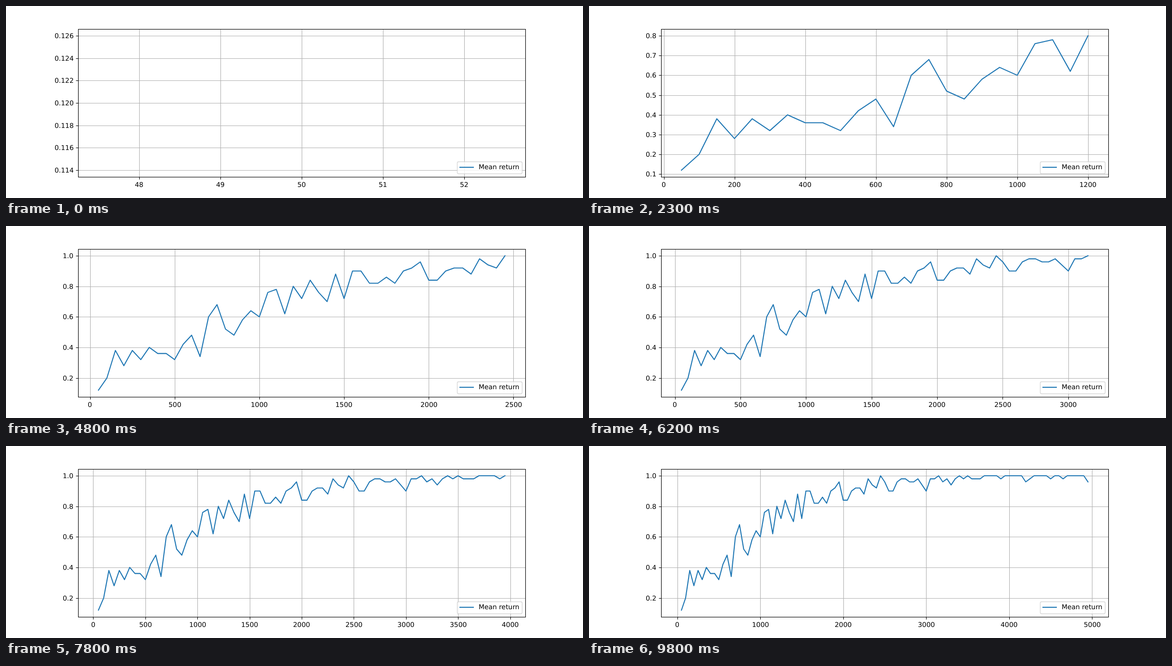
An HTML page with a canvas for the animation above (9.9 s loop, 1200 by 400 pixels).

```html
<!DOCTYPE html>
<html lang="en">
<head>
<meta charset="utf-8">
<title>Mean return</title>
<style>
  html, body { margin: 0; width: 100%; height: 100%; overflow: hidden; background: #fff; }
  canvas { display: block; }
</style>
</head>
<body>
<canvas id="chart" width="1200" height="400"></canvas>
<script>
const ctx = document.getElementById('chart').getContext('2d');

// Mean return in percent, one sample every 50 episodes
const returns = [
  12, 20, 38, 28, 38, 32, 40, 36, 36, 32, 42, 48, 34, 60, 68, 52, 48, 58, 64, 60,
  76, 78, 62, 80, 72, 84, 76, 70, 88, 72, 90, 90, 82, 82, 86, 82, 90, 92, 96, 84,
  84, 90, 92, 92, 88, 98, 94, 92, 100, 96, 90, 90, 96, 98, 98, 96, 96, 98, 94, 90,
  98, 98, 100, 96, 98, 94, 98, 100, 98, 100, 98, 98, 98, 100, 100, 100, 100, 98, 100, 100,
  100, 100, 100, 96, 98, 100, 100, 100, 100, 98, 100, 100, 98, 100, 100, 100, 100, 100, 96
];
const points = returns.map((r, i) => ({ x: 50 * (i + 1), y: r / 100 }));

const STEP_MS = 100;
const LEFT = 150, RIGHT = 1080, TOP = 48, BOTTOM = 356;
const THIN = 1.11, THICK = 2.083, BLUE = '#1f77b4';

const snap = v => Math.floor(v + 0.5) + 0.5;

// Axis limits with a 5% margin; a single value is widened first
function limits(values) {
  let low = Math.min(...values), high = Math.max(...values);
  if (low === high) [low, high] = [low * 0.95, high * 1.05];
  const margin = (high - low) * 0.05;
  return [low - margin, high + margin];
}

// Smallest round step that gives at most nine intervals
function tickStep(low, high) {
  const raw = (high - low) / 9;
  const scale = 10 ** Math.floor(Math.log10(raw));
  return scale * [1, 2, 2.5, 5, 10].find(s => s * scale >= raw);
}

function ticks([low, high]) {
  const step = tickStep(low, high);
  const decimals = Math.max(0, Math.ceil(-Math.log10(step) - 1e-9));
  const list = [];
  for (let k = Math.ceil(low / step); k * step <= high; k++) {
    list.push({ value: k * step, label: (k * step).toFixed(decimals) });
  }
  return list;
}

function segment(x1, y1, x2, y2, color, width = THIN) {
  ctx.strokeStyle = color;
  ctx.lineWidth = width;
  ctx.beginPath();
  ctx.moveTo(x1, y1);
  ctx.lineTo(x2, y2);
  ctx.stroke();
}

// align: 0 = left, 0.5 = centre, 1 = right
function label(text, x, baseline, align) {
  ctx.fillStyle = '#000';
  ctx.fillText(text, Math.round(x - align * ctx.measureText(text).width), Math.round(baseline));
}

function drawCurve(shown, toX, toY) {
  ctx.save();
  ctx.beginPath();
  ctx.rect(LEFT, TOP, RIGHT - LEFT, BOTTOM - TOP);
  ctx.clip();
  ctx.strokeStyle = BLUE;
  ctx.lineWidth = THICK;
  ctx.lineCap = 'square';
  ctx.lineJoin = 'round';
  ctx.beginPath();
  shown.forEach(p => ctx.lineTo(toX(p.x), toY(p.y)));
  if (shown.length > 1) ctx.stroke();
  ctx.restore();
}

function drawLegend() {
  ctx.beginPath();
  ctx.roundRect(938.5, 324.5, 135, 25, 2.78);
  ctx.fillStyle = 'rgba(255, 255, 255, 0.8)';
  ctx.fill();
  ctx.strokeStyle = 'rgba(204, 204, 204, 0.8)';
  ctx.lineWidth = 1.39;
  ctx.stroke();
  segment(943, 336, 973, 336, BLUE, THICK);
  label('Mean return', 983, 340, 0);
}

function draw(count) {
  const shown = points.slice(0, count);
  const xLim = limits(shown.map(p => p.x)), yLim = limits(shown.map(p => p.y));
  const toX = v => LEFT + (v - xLim[0]) / (xLim[1] - xLim[0]) * (RIGHT - LEFT);
  const toY = v => BOTTOM - (v - yLim[0]) / (yLim[1] - yLim[0]) * (BOTTOM - TOP);

  ctx.fillStyle = '#fff';
  ctx.fillRect(0, 0, 1200, 400);
  ctx.font = '13.889px "DejaVu Sans", sans-serif';
  ctx.textRendering = 'geometricPrecision';

  for (const t of ticks(xLim)) {
    const px = toX(t.value), x = snap(px);
    segment(x, TOP, x, BOTTOM, '#b0b0b0');
    segment(x, BOTTOM + 0.5, x, BOTTOM + 5.5, '#000');
    label(t.label, px, 377, 0.5);
  }
  for (const t of ticks(yLim)) {
    const py = toY(t.value), y = snap(py);
    segment(LEFT, y, RIGHT, y, '#b0b0b0');
    segment(LEFT - 4.5, y, LEFT + 0.5, y, '#000');
    label(t.label, 140.28, py + 5, 1);
  }
  drawCurve(shown, toX, toY);
  ctx.strokeStyle = '#000';
  ctx.lineWidth = THIN;
  ctx.strokeRect(LEFT + 0.5, TOP + 0.5, RIGHT - LEFT, BOTTOM - TOP);
  drawLegend();
}

function frame() {
  draw(Math.floor(performance.now() / STEP_MS) % points.length + 1);
  requestAnimationFrame(frame);
}
frame();
</script>
</body>
</html>
```
